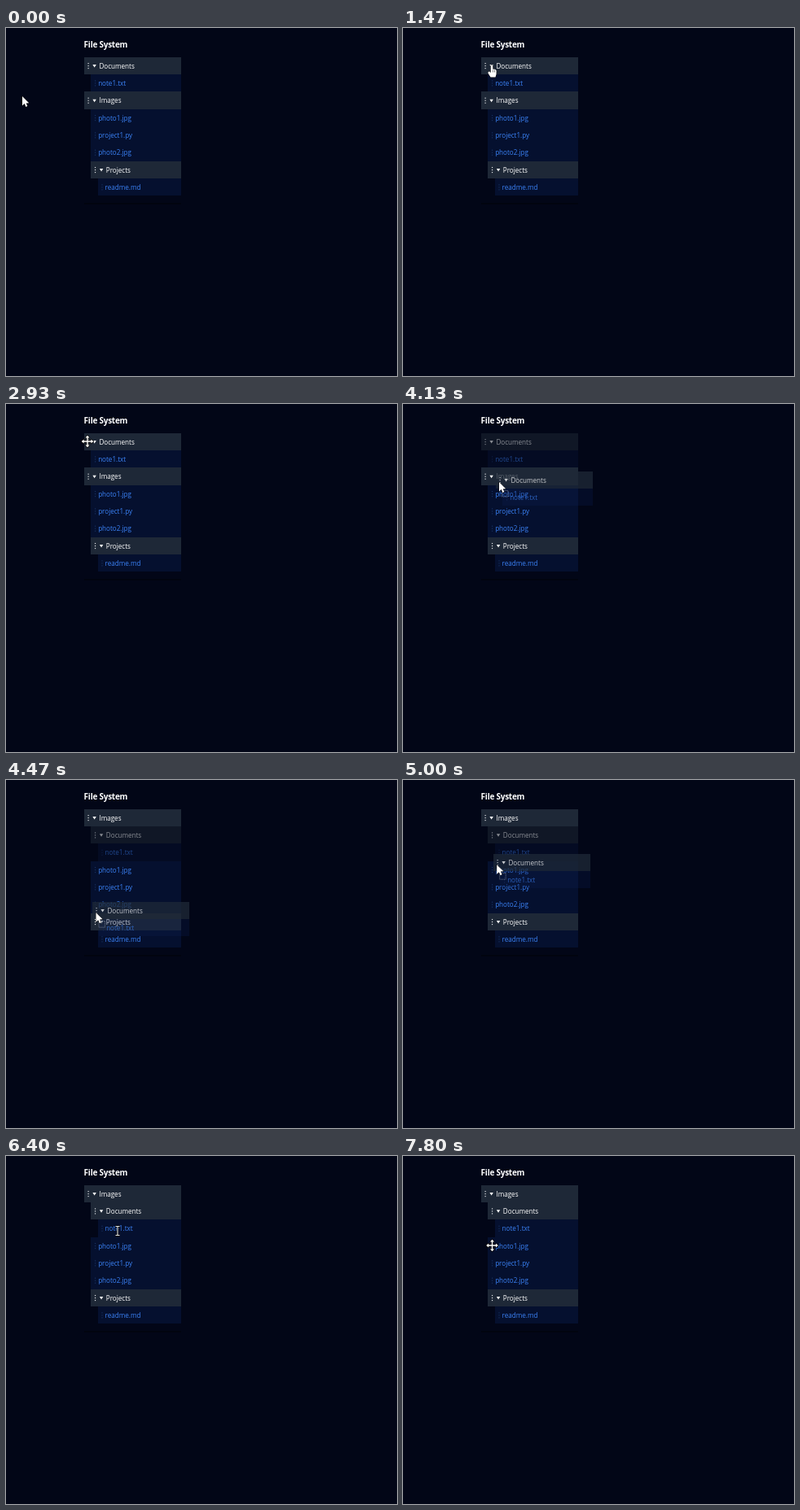
Animation, 480 px wide and 428 px high, one loop 8 s. Source, as an HTML page with a canvas:

```html
<!DOCTYPE html>
<html lang="en">
<head>
<meta charset="utf-8">
<title>File System</title>
<style>
html, body { margin: 0; width: 100%; height: 100%; overflow: hidden; background: #020617; }
canvas { display: block; }
</style>
</head>
<body>
<canvas id="stage" width="480" height="428"></canvas>
<script>
const ctx = document.getElementById('stage').getContext('2d');
const LOOP = 8000, STEPS_PER_MS = 0.015;
const LEFT = 96, RIGHT = 215, TOP = 35.8, ROW = 21.33, INDENT = 8.45;
const FONT = '"Open Sans", "Noto Sans", sans-serif';
const GRAB = { x: 100.3, y: 49 };

// Steps (1/15 s) at which the tree changes.
const COLLAPSE = 27, EXPAND = 44, DRAG = 58, MOVE_IN = 63, DROP = 85;

// The pointer eases to each place and rests there until the next move.
const START = { x: 20, y: 84 };
const move = (from, to, x, y) => ({ from, to, x, y });
const MOVES = [
  // wander over the tree, then to the Documents toggle
  move(0, 5, 135, 21), move(5, 10, 150, 184), move(10, 12, 143, 165), move(17, 22, 109, 46),
  // away, then back to the handle
  move(26, 31, 130, 27), move(31, 34, 143, 160), move(43, 44, 100, 46),
  // drag down the list and back up into Images
  move(57, 62, 118, 96), move(62, 65, 108, 198), move(65, 70, 115, 99),
  move(74, 78, 116, 132), move(78, 82, 111, 107),
  // look over the result, then to the next handle
  move(84, 89, 150, 182), move(89, 96, 137, 92), move(97, 101, 131, 78),
  move(101, 108, 121, 106), move(111, 117, 109.5, 110)
];

function pointerAt(step) {
  let { x, y } = START;
  for (const m of MOVES) {
    const t = Math.min(1, Math.max(0, (step - m.from) / (m.to - m.from)));
    const k = t * t * (3 - 2 * t);
    x += (m.x - x) * k;
    y += (m.y - y) * k;
  }
  return { x, y };
}

const folder = (name, depth, more) => ({ name, depth, folder: true, open: true, alpha: 1, ...more });
const file = (name, depth, more) => ({ name, depth, alpha: 1, ...more });

function treeRows(step) {
  const nested = step >= MOVE_IN ? 1 : 0;
  const alpha = step >= DRAG && step < DROP ? 0.5 : 1;
  const open = step < COLLAPSE || step >= EXPAND;
  const docs = [folder('Documents', nested, { alpha, open })];
  if (open) docs.push(file('note1.txt', nested + 1, { alpha }));
  const images = folder('Images', 0);
  const head = nested ? [images, ...docs] : [...docs, images];
  const rest = [
    file('photo1.jpg', 1), file('project1.py', 1), file('photo2.jpg', 1),
    folder('Projects', 1), file('readme.md', 2)
  ];
  return [...head, ...rest].map((row, i) => ({ ...row, x: LEFT + row.depth * INDENT, y: TOP + i * ROW }));
}

function polygon(points) {
  ctx.beginPath();
  points.forEach(([x, y]) => ctx.lineTo(x, y));
  ctx.closePath();
}

function text(str, x, y, size, color, weight = 500, tracking = 0) {
  ctx.font = `${weight} ${size}px ${FONT}`;
  ctx.letterSpacing = `${tracking * size}px`;
  ctx.fillStyle = color;
  ctx.fillText(str, x, y);
}

function drawRow({ name, folder, open, alpha, x, y }) {
  const left = Math.round(x), top = Math.round(y);
  const bottom = Math.round(y + ROW), mid = y + ROW / 2;
  ctx.globalAlpha = alpha;
  ctx.fillStyle = folder ? '#1e2837' : 'rgba(12,30,84,0.4)';
  ctx.fillRect(left, top, RIGHT - left, bottom - top);

  ctx.fillStyle = folder ? '#e5e7eb' : '#18305f';
  for (const dy of [-3, 0, 3]) ctx.fillRect(x + 4.5, mid + dy - 0.5, 1.2, 1.2);

  if (folder) {
    const tx = x + 12.6;
    polygon(open
      ? [[tx - 2.2, mid - 1.5], [tx + 2.2, mid - 1.5], [tx, mid + 2]]
      : [[tx - 1.5, mid - 2.2], [tx + 2, mid], [tx - 1.5, mid + 2.2]]);
    ctx.fillStyle = '#fff';
    ctx.fill();
  }
  text(name, x + (folder ? 18.4 : 8.7), y + 14, 8.1, folder ? '#fff' : '#3b82f6');
  ctx.globalAlpha = 1;
}

function drawGhost(p) {
  ctx.save();
  ctx.translate(Math.round(p.x - GRAB.x), Math.round(p.y - GRAB.y));
  drawRow(folder('Documents', 0, { x: LEFT, y: TOP, alpha: 0.75 }));
  drawRow(file('note1.txt', 1, { x: LEFT + INDENT, y: TOP + ROW, alpha: 0.68 }));
  ctx.restore();
}

function pointerKind({ x, y }, rows) {
  if (y > 14 && y < 26 && x > LEFT && x < 149) return 'text';
  const row = rows.find(r => y >= r.y && y < r.y + ROW && x >= r.x && x < RIGHT);
  if (!row) return 'arrow';
  if (x < row.x + 7.5) return 'move';
  if (row.folder) return 'hand';
  return x < row.x + 52 ? 'text' : 'arrow';
}

function outlined(width) {
  ctx.lineJoin = 'round';
  ctx.strokeStyle = '#000';
  ctx.lineWidth = width;
  ctx.stroke();
  ctx.fillStyle = '#fff';
  ctx.fill();
}

const cursors = {
  arrow() {
    polygon([[0, 0], [0, 11.5], [2.7, 9.1], [4.4, 13], [6.4, 12.1], [4.7, 8.4], [8.2, 8.2]]);
    outlined(1);
  },
  hand() {
    ctx.beginPath();
    ctx.moveTo(-1.3, 9);
    ctx.lineTo(-1.3, 0.6);
    ctx.quadraticCurveTo(0, -1.2, 1.3, 0.6);
    ctx.lineTo(1.3, 4.7);
    ctx.quadraticCurveTo(5, 4.2, 5.7, 6.5);
    ctx.quadraticCurveTo(6, 11, 4.5, 14.5);
    ctx.lineTo(-1.5, 14.5);
    ctx.lineTo(-4.6, 9.5);
    ctx.quadraticCurveTo(-4.9, 7.1, -2.8, 7.5);
    ctx.closePath();
    outlined(1);
    ctx.lineWidth = 0.5;
    for (const x of [1.4, 3.5]) {
      ctx.beginPath();
      ctx.moveTo(x, 5.5);
      ctx.lineTo(x, 8.5);
      ctx.stroke();
    }
  },
  text() {
    const bars = (width, color) => {
      ctx.beginPath();
      for (const s of [-1, 1]) {
        ctx.moveTo(-2.5, 5.5 * s);
        ctx.lineTo(2.5, 5.5 * s);
      }
      ctx.moveTo(0, -5.5);
      ctx.lineTo(0, 5.5);
      ctx.strokeStyle = color;
      ctx.lineWidth = width;
      ctx.stroke();
    };
    bars(2.4, '#000');
    bars(1.1, '#e5e7eb');
  },
  move() {
    const arm = [[-0.7, -0.7], [-0.7, -4.4], [-2.6, -4.4], [0, -7.3], [2.6, -4.4], [0.7, -4.4]];
    const points = [];
    for (let q = 0; q < 4; q++) {
      const c = Math.round(Math.cos(q * Math.PI / 2)), s = Math.round(Math.sin(q * Math.PI / 2));
      for (const [x, y] of arm) points.push([x * c - y * s, x * s + y * c]);
    }
    polygon(points);
    outlined(1.4);
  },
  drag() {
    ctx.setLineDash([1, 1]);
    ctx.strokeStyle = '#8b95a5';
    ctx.lineWidth = 0.8;
    ctx.strokeRect(3.5, 10.5, 7.5, 7.5);
    ctx.setLineDash([]);
    cursors.arrow();
  }
};

function render(ms) {
  const step = Math.floor((ms % LOOP) * STEPS_PER_MS + 0.1);
  const rows = treeRows(step), p = pointerAt(step);
  const dragging = step >= DRAG && step < DROP;

  ctx.fillStyle = '#020617';
  ctx.fillRect(0, 0, 480, 428);
  ctx.fillStyle = 'rgba(0,0,0,0.35)';
  ctx.fillRect(LEFT, 215, RIGHT - LEFT, 2);
  text('File System', 95.6, 23.6, 10, '#fff', 700, -0.025);
  rows.forEach(drawRow);
  if (dragging) drawGhost(p);

  ctx.save();
  ctx.translate(p.x, p.y);
  cursors[dragging ? 'drag' : pointerKind(p, rows)]();
  ctx.restore();
}

const start = performance.now();
function tick() {
  render(performance.now() - start);
  requestAnimationFrame(tick);
}
tick();
</script>
</body>
</html>
```
